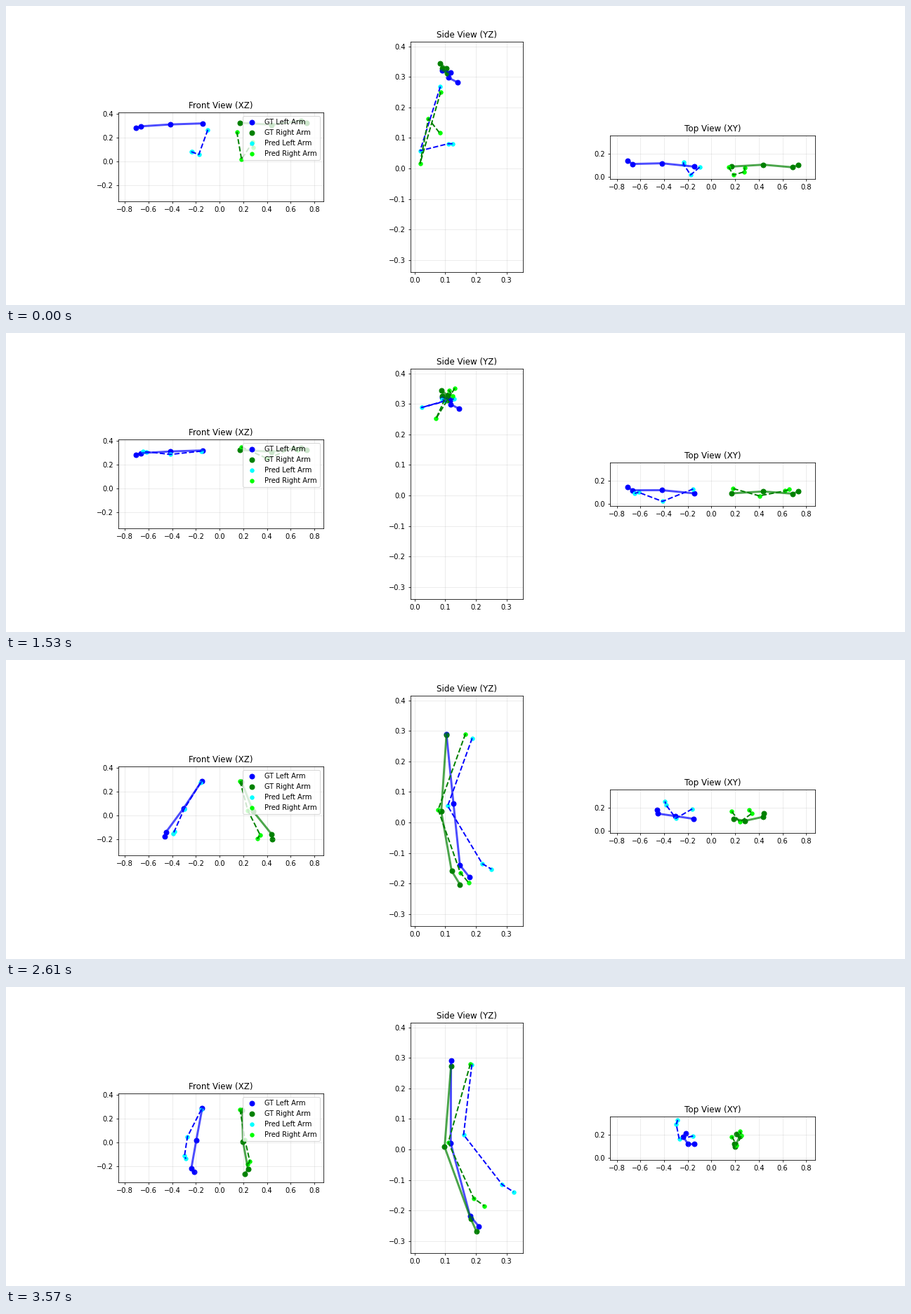
A matplotlib script that plays this animation: 1280 px wide and 427 px high, repeating every 3600 ms.

```python
import numpy as np
import matplotlib.pyplot as plt
from matplotlib.animation import FuncAnimation

DPI = 1280 / 18
WIDTH, HEIGHT = 1280.001, 427.001  # a hair over, so rounding down keeps whole pixels
FRAMES, INTERVAL = 120, 30

# Poses: shoulder, elbow, wrist, hand, each as x, y, z.
GT_LEFT = [
    [-.146, .089, .322, -.419, .117, .313, -.668, .111, .297, -.707, .140, .282],
    [-.146, .091, .322, -.419, .118, .313, -.668, .117, .299, -.707, .145, .284],
    [-.152, .098, .310, -.419, .117, .243, -.660, .119, .185, -.700, .148, .171],
    [-.157, .106, .296, -.377, .124, .134, -.583, .134, -.005, -.613, .163, -.036],
    [-.152, .104, .289, -.304, .127, .061, -.452, .148, -.140, -.461, .179, -.179],
    [-.150, .112, .290, -.209, .122, .020, -.262, .153, -.221, -.247, .181, -.261],
    [-.147, .119, .291, -.197, .118, .020, -.239, .181, -.218, -.217, .210, -.252],
]
GT_RIGHT = [
    [.170, .089, .327, .437, .105, .311, .687, .083, .344, .733, .104, .327],
    [.170, .091, .326, .437, .107, .311, .687, .088, .344, .733, .108, .327],
    [.172, .098, .314, .427, .095, .229, .679, .093, .210, .721, .114, .190],
    [.181, .106, .295, .371, .096, .107, .595, .116, -.014, .620, .142, -.048],
    [.185, .104, .286, .282, .087, .036, .439, .121, -.159, .442, .148, -.203],
    [.190, .112, .274, .188, .096, .008, .253, .135, -.234, .238, .156, -.277],
    [.191, .119, .274, .197, .098, .008, .239, .183, -.226, .212, .202, -.268],
]
PRED_LEFT = [
    [-.100, .084, .268, -.176, .018, .058, -.236, .110, .081, -.235, .125, .081],
    [-.154, .128, .316, -.414, .023, .288, -.616, .100, .310, -.648, .091, .314],
    [-.162, .135, .306, -.400, .049, .236, -.590, .124, .209, -.635, .120, .195],
    [-.158, .166, .283, -.314, .100, .093, -.406, .204, -.064, -.416, .231, -.085],
    [-.162, .188, .276, -.300, .108, .054, -.383, .221, -.135, -.392, .251, -.153],
    [-.156, .185, .280, -.304, .135, .075, -.368, .257, -.080, -.361, .280, -.115],
    [-.155, .187, .278, -.272, .160, .048, -.297, .286, -.115, -.285, .323, -.139],
]
PRED_RIGHT = [
    [.145, .085, .250, .185, .018, .017, .278, .045, .163, .281, .082, .116],
    [.184, .131, .351, .404, .070, .252, .622, .112, .344, .655, .124, .326],
    [.172, .137, .326, .376, .054, .193, .602, .110, .200, .624, .120, .143],
    [.174, .157, .297, .257, .066, .061, .388, .146, -.116, .367, .174, -.172],
    [.172, .166, .290, .238, .077, .042, .341, .149, -.164, .318, .177, -.198],
    [.172, .175, .287, .240, .085, .040, .321, .161, -.161, .295, .190, -.197],
    [.172, .182, .280, .213, .110, .023, .255, .193, -.160, .238, .228, -.185],
]
LATE_KEYS = [52, 64, 77, 87, 103, 119]


def glide(keys, values):
    """Sample a monotone cubic through the keys on every frame."""
    t, v = np.array(keys, float), np.array(values)
    h = np.diff(t)
    slope = np.diff(v, axis=0) / h[:, None]
    a, b = slope[:-1], slope[1:]
    same = a * b > 0
    inner = np.where(same, 2 * a * b / np.where(same, a + b, 1), 0)
    m = np.vstack([slope[:1], inner, slope[-1:]])
    f = np.arange(FRAMES)
    i = np.clip(np.searchsorted(t, f, side="right") - 1, 0, len(h) - 1)
    w = h[i][:, None]
    s = (f - t[i])[:, None] / w
    return ((1 + 2 * s) * (1 - s) ** 2 * v[i] + s * (1 - s) ** 2 * w * m[i]
            + s * s * (3 - 2 * s) * v[i + 1] + s * s * (s - 1) * w * m[i + 1])


def arm_track(poses, settle):
    # The second pose is reached at `settle` and held until the arms drop.
    held = poses[:2] + poses[1:]
    return glide([0, settle] + LATE_KEYS, held).reshape(FRAMES, 4, 3)


GT_STYLE = dict(lw=3, alpha=0.7)
PRED_STYLE = dict(lw=2, ls="--")
ARMS = [
    ("GT Left Arm", arm_track(GT_LEFT, 15), "blue", "blue", 50, GT_STYLE),
    ("GT Right Arm", arm_track(GT_RIGHT, 15), "green", "green", 50, GT_STYLE),
    ("Pred Left Arm", arm_track(PRED_LEFT, 8), "cyan", "blue", 30, PRED_STYLE),
    ("Pred Right Arm", arm_track(PRED_RIGHT, 8), "lime", "green", 30, PRED_STYLE),
]
LIMITS = [(-0.855, 0.875), (-0.0135, 0.354), (-0.3395, 0.4145)]
VIEWS = [("Front View (XZ)", [0, 2]), ("Side View (YZ)", [1, 2]), ("Top View (XY)", [0, 1])]

fig, axes = plt.subplots(1, 3, figsize=(WIDTH / DPI, HEIGHT / DPI), dpi=DPI)
parts = []
for ax, (title, dims) in zip(axes, VIEWS):
    ax.set_title(title)
    ax.set_xlim(LIMITS[dims[0]])
    ax.set_ylim(LIMITS[dims[1]])
    ax.set_aspect("equal")
    ax.grid(True, alpha=0.3)
    for label, track, dot, line, size, style in ARMS:
        path = track[:, :, dims]
        joints = ax.scatter(*path[0].T, c=dot, s=size, label=label)
        bones, = ax.plot(*path[0].T, color=line, **style)
        parts.append((path, joints, bones))
axes[0].legend(loc="upper right")


def update(frame):
    for path, joints, bones in parts:
        joints.set_offsets(path[frame])
        bones.set_data(*path[frame].T)
    return []


anim = FuncAnimation(fig, update, frames=FRAMES, interval=INTERVAL,
                     repeat=True, repeat_delay=0, blit=False)
plt.show()
```
